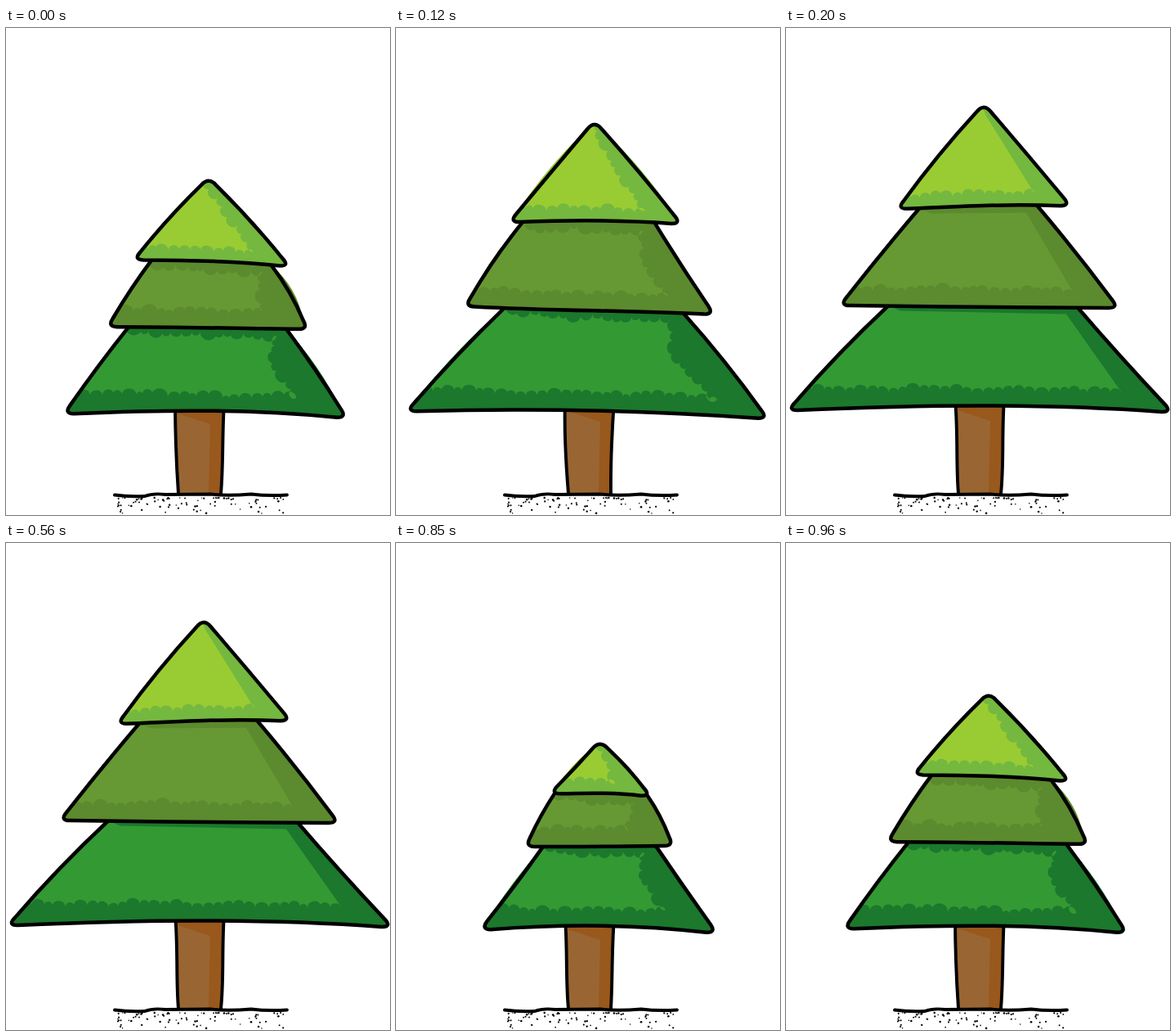
An HTML page for the animation above (1000 ms loop, 470 by 595 pixels).

```html
<!DOCTYPE html>
<html lang="en">
<head>
<meta charset="utf-8">
<title>Growing tree</title>
<style>
  html, body { margin: 0; width: 100%; height: 100%; overflow: hidden; background: #fff; }
  svg { display: block; width: 100%; height: 100%; }
  .pose { visibility: hidden; animation: 1s step-end infinite; }
  .ink { fill: none; stroke: #000; stroke-width: 4.5; stroke-linecap: round; stroke-linejoin: round; }
  .thin { stroke-width: 3.9; }
  #rest { animation-name: rest; }
  #rise { animation-name: rise; }
  #stretch { animation-name: stretch; }
  #tall { animation-name: tall; }
  #small { animation-name: small; }
  #regrow { animation-name: regrow; }
  @keyframes rest { 0%, 96% { visibility: visible } 4% { visibility: hidden } }
  @keyframes rise { 4% { visibility: visible } 0%, 12% { visibility: hidden } }
  @keyframes stretch { 12% { visibility: visible } 0%, 20% { visibility: hidden } }
  @keyframes tall { 20% { visibility: visible } 0%, 80% { visibility: hidden } }
  @keyframes small { 80% { visibility: visible } 0%, 88% { visibility: hidden } }
  @keyframes regrow { 88% { visibility: visible } 0%, 96% { visibility: hidden } }
</style>
</head>
<body>
<svg id="stage" viewBox="0 0 470 595"></svg>
<script>
// Look of each tier, top to bottom: how far the shade reaches in from the
// right corner and the hem, and how much the hem arches.
const TIERS = [
  { light: '#99cc33', shade: '#74b83f', side: 44, hem: 15, arch: 1.5 },
  { light: '#669933', shade: '#5c8a2e', side: 56, hem: 20, arch: 0 },
  { light: '#339933', shade: '#1b782c', side: 62, hem: 25, arch: 6 }
];
const BARK = { light: '#996633', shade: '#99581c' };

// Key points: the apex, then per tier its left and right corner;
// tops are the x positions where lower tiers emerge from the one above.
const POSES = {
  rest: {
    apex: [248, 182], tops: [[178, 325], [150, 343]], leafy: true,
    corners: [[[156, 283], [347, 291]], [[124, 365], [370, 368]], [[71, 471], [417, 476]]]
  },
  rise: {
    apex: [256, 151], tops: [[176, 312], [158, 345]], leafy: true,
    corners: [[[148, 266], [346, 268]], [[113, 348], [379, 353]], [[48, 474], [433, 480]]]
  },
  stretch: {
    apex: [243, 113], tops: [[155, 317], [133, 352]], leafy: true,
    corners: [[[139, 237], [349, 239]], [[84, 340], [389, 350]], [[13, 468], [455, 477]]]
  },
  tall: {
    apex: [242, 92], tops: [[163, 308], [125, 357]], leafy: false,
    corners: [[[136, 221], [348, 217]], [[66, 339], [407, 342]], [[2, 467], [472, 469]]]
  },
  small: {
    apex: [250, 241], tops: [[194, 308], [180, 318]], leafy: true,
    corners: [[[189, 306], [312, 309]], [[158, 371], [340, 370]], [[104, 472], [392, 476]]]
  },
  regrow: {
    apex: [256, 224], tops: [[190, 308], [173, 336]], leafy: true,
    corners: [[[179, 302], [318, 303]], [[150, 361], [347, 371]], [[97, 463], [398, 472]]]
  }
};

function seeded(seed) {
  const next = () => (seed = (seed * 16807) % 2147483647) / 2147483647;
  next();
  return (low = 0, high = 1) => low + (high - low) * next();
}

const mix = ([ax, ay], [bx, by], t) => [ax + (bx - ax) * t, ay + (by - ay) * t];
const distance = ([ax, ay], [bx, by]) => Math.hypot(bx - ax, by - ay);
const toward = (a, b, length) => mix(a, b, length / distance(a, b));
const line = points => 'L' + points.join('L');
const fill = (d, color, extra = '') => `<path d="${d}" fill="${color}" ${extra}/>`;
const ink = (d, kind = '') => `<path d="${d}" class="ink ${kind}"/>`;

// Point beside the line a to b, moved outwards by the given amount.
function beside(a, b, t, amount) {
  const [x, y] = mix(a, b, t), length = distance(a, b) || 1;
  return [x - (b[1] - a[1]) / length * amount, y + (b[0] - a[0]) / length * amount];
}

const bowed = (a, b, bow) => `Q${beside(a, b, .5, bow * 2)} ${b}`;

// Left side, rounded corner, hem, rounded corner, right side.
function tierEdge({ topLeft, topRight, left, right, waves, peaked }, bows) {
  const round = 12;
  const start = peaked ? toward(topLeft, left, 13) : topLeft;
  const end = peaked ? toward(topRight, right, 13) : topRight;
  const leftSide = toward(left, topLeft, round), rightSide = toward(right, topRight, round);
  const hemStart = toward(left, right, round), hemEnd = toward(right, left, round);
  const [c1, c2] = waves.map((lift, i) => beside(hemStart, hemEnd, (i + 1) / 3, -lift));
  return `M${start}${bowed(start, leftSide, bows[0])}Q${left} ${hemStart}`
    + `C${c1} ${c2} ${hemEnd}Q${right} ${rightSide}${bowed(rightSide, end, bows[1])}`
    + (peaked ? `Q${topLeft} ${start}Z` : '');
}

// Row of leafy bumps along a polyline, bulging into the lit side.
function scallop(points, random) {
  let from = points[0], d = '';
  for (let i = 1; i < points.length; i++) {
    const a = points[i - 1], b = points[i];
    const count = Math.max(1, Math.round(distance(a, b) / 13));
    for (let k = 1; k <= count; k++) {
      const t = (k + (k < count ? random(-.3, .3) : 0)) / count;
      const to = beside(a, b, t, random(-3, 3));
      const r = distance(from, to) * .52;
      d += `A${r} ${r} 0 0 1 ${to}`;
      from = to;
    }
  }
  return d;
}

function litArea({ topLeft, topRight, left, right, peaked }, { side, hem }, leafy, random) {
  const low = [left[0] - 8, left[1] - hem];
  const corner = [right[0] - side, right[1] - hem];
  const [x, y] = topRight;
  const rest = peaked
    ? [corner, [x + 2, y + 14], [x - 6, y - 8]]
    : [corner, [x - 16, (y + corner[1]) / 2], [x - 14, y + 8],
      [topLeft[0] + 15, topLeft[1] + 6], [topLeft[0] - 15, topLeft[1] - 6]];
  return `M${low}` + scallop([low, corner], random)
    + (leafy ? scallop(rest, random) : line([rest[0], ...rest.slice(peaked ? 1 : 2)])) + 'Z';
}

function drawTier(shape, look, leafy, id, random) {
  const bows = [random(-1, 2.5), random(-1, 2.5)];
  const edge = tierEdge(shape, bows);
  // The paint is looser than the ink and spills over the sides.
  let body = tierEdge(shape, bows.map(bow => bow + random(0, 4.5)));
  if (!shape.peaked) {
    const [lx, ly] = shape.topLeft, [rx, ry] = shape.topRight;
    body += line([[rx - 10, ry - 10], [lx + 10, ly - 10]]) + 'Z';
  }
  return `<clipPath id="${id}"><path d="${body}"/></clipPath>` + fill(body, look.shade)
    + fill(litArea(shape, look, leafy, random), look.light, `clip-path="url(#${id})"`) + ink(edge);
}

function drawTrunk(top, random) {
  const bottom = 569, shadeWidth = 15;
  const side = (x1, x2) => {
    const bend = t => [x1 + (x2 - x1) * t + random(-3, 3), top + (bottom - top) * t];
    return `M${x1},${top}C${bend(.35)} ${bend(.7)} ${x2},${bottom}`;
  };
  const left = side(207, 211), right = side(267, 263);
  return fill(`${right}L211,${bottom}L207,${top}Z`, BARK.light)
    + fill(`${left}L230,${bottom}V${top}Z`, BARK.light)
    + fill(`${right}h${-shadeWidth}L${265 - shadeWidth},${top + 26}L207,${top + 12}V${top}Z`, BARK.shade)
    + ink(left, 'thin') + ink(right, 'thin');
}

function drawPose(name, { apex, tops, corners, leafy }, seed) {
  const random = seeded(seed);
  const onHem = (x, [left, right]) =>
    [x, mix(left, right, (x - left[0]) / (right[0] - left[0]))[1]];
  let art = drawTrunk(corners[2][0][1] - 13, random);
  for (const i of [2, 1, 0]) {
    const [topLeft, topRight] = i ? tops[i - 1].map(x => onHem(x, corners[i - 1])) : [apex, apex];
    const [left, right] = corners[i];
    const waves = [0, 1].map(() => TIERS[i].arch * 4 / 3 + random(-2.5, 2.5));
    const shape = { topLeft, topRight, left, right, waves, peaked: i === 0 };
    art += drawTier(shape, TIERS[i], leafy, `${name}-${i}`, random);
  }
  return `<g id="${name}" class="pose">${art}</g>`;
}

function drawGround() {
  const random = seeded(77);
  let art = ink('M133 570.5Q150 573 170 572Q180 568 195 570L250 569.5Q270 572 300 569.5Q320 572 344 570.5', 'thin');
  for (let i = 0; i < 85; i++) {
    const x = random(136, 342), y = 574 + random() ** 1.7 * 19;
    art += `<circle cx="${x}" cy="${y}" r="${random(.7, 1.3)}"/>`;
  }
  return art;
}

document.getElementById('stage').innerHTML =
  Object.entries(POSES).map(([name, pose], i) => drawPose(name, pose, 101 + i * 37)).join('') + drawGround();
</script>
</body>
</html>
```
